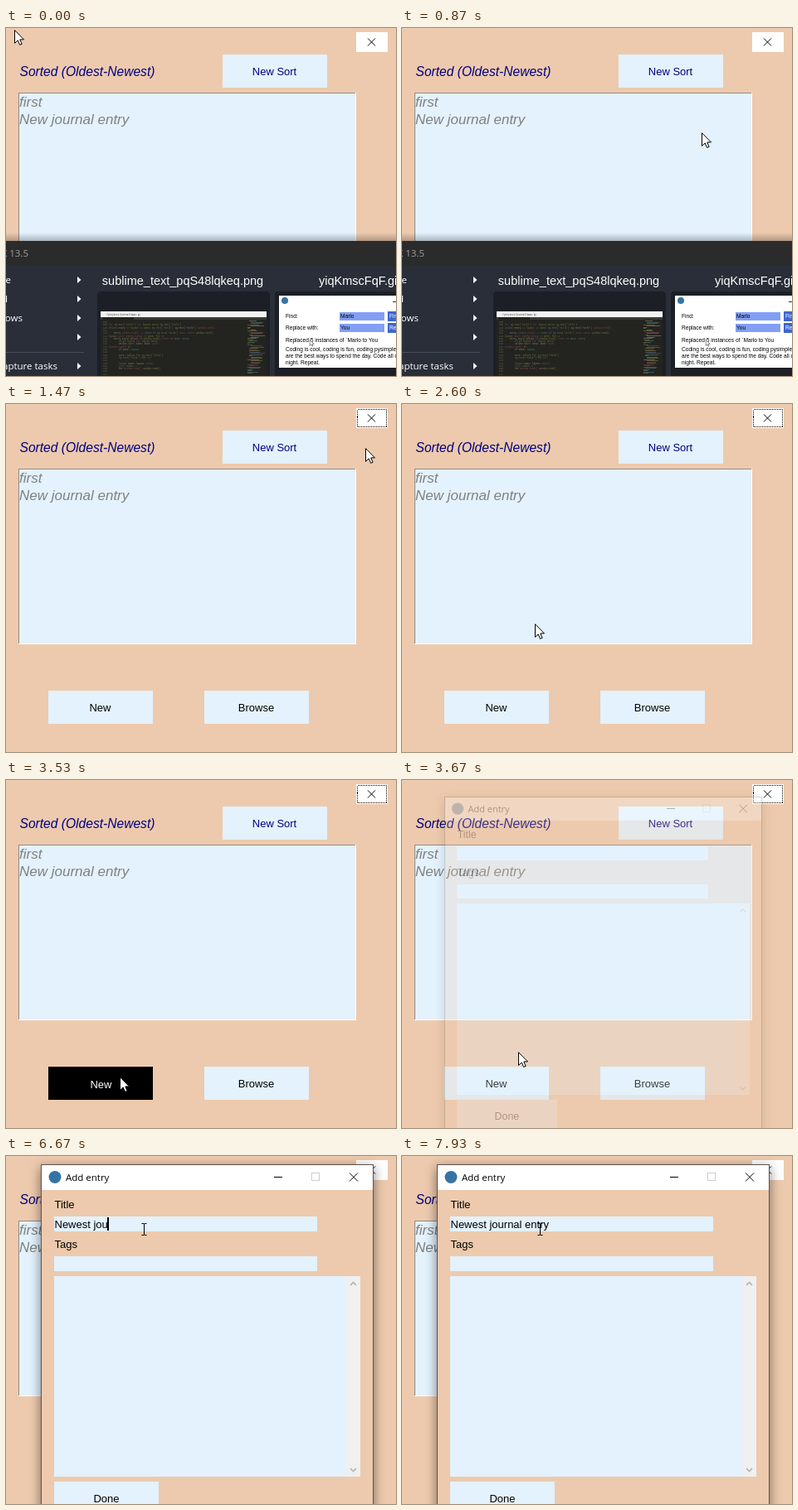
Animation of 470 by 420 pixels, one loop 8 s. Source, as an HTML page:

```html
<!DOCTYPE html>
<html lang="en">
<head>
<meta charset="utf-8">
<title>Journal app</title>
<style>
html, body { margin: 0; width: 100%; height: 100%; overflow: hidden; background: #edcaad; }
svg { display: block; width: 470px; height: 420px; }
rect { shape-rendering: crispEdges; }
text { font: 13px "Liberation Sans", Arial, sans-serif; white-space: pre; }
.mid { text-anchor: middle; }
.end { text-anchor: end; }
.navy { fill: #000080; }
.head { font-size: 15.6px; font-style: italic; }
.item { font-size: 17px; font-style: italic; fill: #808080; }
.ui { font: 11.5px "Open Sans", "Noto Sans", sans-serif; }
.file { font-size: 14.5px; fill: #fff; }
.small { font-size: 6.6px; }
.code { font: 2.7px "Liberation Mono", monospace; }
.pale { fill: #e3f2fd; }
.line { fill: none; stroke: #000; }
#shadow { filter: drop-shadow(0 4px 7px rgba(0, 0, 0, .5)); }
</style>
</head>
<body>
<svg viewBox="0 0 470 420">
  <defs>
    <linearGradient id="shade" x1="0" y1="0" x2="0" y2="1">
      <stop offset="0" stop-color="#000" stop-opacity="0"/>
      <stop offset="1" stop-color="#000" stop-opacity=".25"/>
    </linearGradient>
    <clipPath id="thumb"><rect x="114" y="342" width="200" height="78"/></clipPath>
  </defs>

  <!-- Main window -->
  <rect width="470" height="420" fill="#edcaad"/>
  <rect x="422" y="5" width="38" height="24" fill="#fff"/>
  <path class="line" d="M436 12.5l9 9m0-9l-9 9"/>
  <rect id="focus" class="line" x="423.5" y="6.5" width="35" height="21" stroke-dasharray="1 1"/>
  <text class="head navy" x="16.5" y="58">Sorted (Oldest-Newest)</text>
  <rect class="pale" x="261" y="32" width="126" height="40"/>
  <text class="mid navy" x="323.5" y="57">New Sort</text>
  <rect x="15" y="78" width="407" height="212" fill="#fff"/>
  <rect x="15" y="78" width="406" height="211" fill="#8c8c8c"/>
  <rect class="pale" x="16" y="79" width="405" height="210"/>
  <text class="item" x="16" y="95">first</text>
  <text class="item" x="16" y="116">New journal entry</text>
  <rect id="newBtn" x="51" y="346" width="126" height="40"/>
  <text id="newText" class="mid" x="113.5" y="371">New</text>
  <rect class="pale" x="239" y="346" width="126" height="40"/>
  <text class="mid" x="301.5" y="371">Browse</text>

  <!-- Capture tool covering the lower part -->
  <g id="tool">
    <rect x="0" y="247" width="470" height="10" fill="url(#shade)"/>
    <rect x="0" y="257" width="470" height="163" fill="#2a2e38"/>
    <rect x="0" y="257" width="470" height="30" fill="#2b2b2b"/>
    <text class="ui end" x="27" y="276" fill="#a0a0a0">K 13.5</text>
    <g class="ui" fill="#fff">
      <text class="ui end" x="6" y="308">re</text>
      <text class="ui end" x="2" y="331">d</text>
      <text class="ui end" x="20" y="354">ows</text>
      <text class="ui end" x="62" y="412">apture tasks</text>
      <path d="M86 300l4.5 4-4.5 4zm0 23l4.5 4-4.5 4zm0 23l4.5 4-4.5 4zm0 23l4.5 4-4.5 4zm0 35l4.5 4-4.5 4z"/>
    </g>
    <rect x="0" y="391" width="94" height="1" fill="#464b58"/>
    <text class="file mid" x="213" y="310">sublime_text_pqS48lqkeq.png</text>
    <text class="file" x="377" y="310">yiqKmscFqF.gif</text>
    <rect x="110" y="318" width="208" height="110" rx="4" fill="#1c1f25"/>
    <rect x="324" y="318" width="208" height="110" rx="4" fill="#1c1f25"/>

    <g id="editor" clip-path="url(#thumb)">
      <rect x="114" y="342" width="200" height="78" fill="#23241f"/>
      <rect x="114" y="342" width="200" height="7" fill="#f2f2f2"/>
      <rect x="114" y="349" width="200" height="3" fill="#3a3b36"/>
      <rect x="116" y="349" width="38" height="3" fill="#23241f"/>
      <text class="code" x="120" y="347" fill="#333">~/projects/journal/main.py</text>
    </g>

    <rect x="329" y="323" width="141" height="87" fill="#fff"/>
    <circle cx="336" cy="329" r="4" fill="#3673a5"/>
    <rect x="466" y="330" width="4" height="1" fill="#333"/>
    <rect x="402" y="343" width="54" height="10" fill="#829ff5"/>
    <rect x="402" y="357" width="54" height="10" fill="#829ff5"/>
    <rect x="460" y="342" width="10" height="12" fill="#3f66d0"/>
    <rect x="460" y="356" width="10" height="12" fill="#3f66d0"/>
    <text class="small" x="337" y="350">Find:</text>
    <text class="small" x="337" y="364">Replace with:</text>
    <text class="small" x="403" y="350">Marlo</text>
    <text class="small" x="403" y="364">You</text>
    <text class="small" x="462" y="350" fill="#fff">Find</text>
    <text class="small" x="462" y="364" fill="#fff">Replace</text>
    <text class="small" x="337" y="379">Replaced 5 instances of `Marlo to You</text>
    <text class="small" x="337" y="390">Coding is cool, coding is fun, coding pysimplegui</text>
    <text class="small" x="337" y="398">are the best ways to spend the day. Code all day, all</text>
    <text class="small" x="337" y="406">night. Repeat.</text>
    <use href="#arrow" transform="translate(366 376) scale(.45)"/>
  </g>

  <!-- Add entry dialog -->
  <g id="dialog">
    <rect id="shadow" x="42" y="10" width="401" height="440" fill="#5c5550"/>
    <rect x="43" y="11" width="399" height="30" fill="#fff"/>
    <rect x="43" y="41" width="399" height="400" fill="#edcaad"/>
    <circle cx="59" cy="25.500" r="7.500" fill="#3673a5"/>
    <text class="ui" x="72" y="30">Add entry</text>
    <rect x="323" y="25" width="10" height="1"/>
    <rect class="line" x="368.5" y="20.500" width="9" height="9" style="stroke:#ccc"/>
    <path class="line" d="M414 20.500l10 10m0-10l-10 10"/>
    <text x="58.500" y="63">Title</text>
    <rect class="pale" x="58" y="73" width="317" height="18"/>
    <text id="typed" x="58.500" y="87"></text>
    <rect id="caret" y="74" width="2" height="16"/>
    <text x="58.500" y="111">Tags</text>
    <rect class="pale" x="58" y="121" width="317" height="18"/>
    <rect class="pale" x="58" y="145" width="369" height="242"/>
    <rect x="410" y="145" width="17" height="242" fill="#f0f0f0"/>
    <path class="line" d="M415 156l3.500-3.500 3.500 3.500M415 377l3.500 3.500 3.500-3.500" style="stroke:#b4b4b4;stroke-width:1.700"/>
    <rect class="pale" x="58" y="393" width="126" height="40"/>
    <text class="mid" x="121" y="418">Done</text>
  </g>

  <path id="beam" class="line" d="M-3 -6.500h2.500l.5 .5 .5-.5h2.500M0 -6v13M-3 7.500h2.500l.5-.5 .5 .5h2.500"/>
  <g id="pointer"><path id="arrow" d="M.5 .7V16.400L4.200 12.900 6.600 18.400 9.100 17.300 6.800 11.900H11.500Z" fill="#fff" stroke="#000"/></g>
</svg>
<script>
const LOOP = 8000, TICK = 200 / 3;
const el = id => document.getElementById(id);
const [focusBox, newBtn, newText, tool, dialog, typed, caret, beam, pointer] =
  ["focus", "newBtn", "newText", "tool", "dialog", "typed", "caret", "beam", "pointer"].map(el);

// Pointer path: time, x, y
const PATH = [
  [200, 10, 2], [333, 60, 70], [467, 150, 165], [600, 245, 212], [733, 318, 180],
  [867, 361, 126], [1067, 387, 83], [1200, 415, 63], [1333, 433, 53],
  [1867, 433, 53], [2067, 395, 90], [2333, 270, 190], [2533, 175, 255], [2733, 130, 285],
  [2933, 127, 315], [3133, 142, 345], [3333, 137, 358],
  [3600, 137, 358], [3733, 143, 300], [3933, 160, 140], [4067, 166.5, 88]
];

// Typing: time, number of letters shown
const ENTRY = "Newest journal entry";
const KEYS = [
  [5333, 1], [5467, 2], [5533, 3], [5733, 4], [5867, 5], [6000, 6], [6200, 7],
  [6533, 9], [6667, 10], [6800, 11], [6933, 12], [7000, 13], [7067, 14], [7133, 15],
  [7333, 16], [7467, 17], [7533, 18], [7733, 20]
];

// Times at which the caret switches, starting with on
const BLINK = [3867, 4333, 4600, 5200, 5533, 6133, 6400, 7067, 7267, 7933];

function pointAt(t) {
  const i = PATH.findIndex(p => p[0] > t);
  if (i === 0) return PATH[0].slice(1);
  if (i < 0) return PATH[PATH.length - 1].slice(1);
  const [a, b] = [PATH[i - 1], PATH[i]];
  const k = (t - a[0]) / (b[0] - a[0]);
  return [a[1] + (b[1] - a[1]) * k, a[2] + (b[2] - a[2]) * k];
}

const show = (node, on) => node.setAttribute("visibility", on ? "visible" : "hidden");

function draw(now) {
  const t = Math.floor((now % LOOP + 4) / TICK) * TICK + 1;

  show(tool, t < 1460);
  show(focusBox, t > 1460 && t < 3700);

  const down = t > 3530 && t < 3660;
  newBtn.setAttribute("fill", down ? "#000" : "#e3f2fd");
  newText.setAttribute("fill", down ? "#fff" : "#000");
  newText.setAttribute("transform", down ? "translate(1 1)" : "");

  const open = Math.max(0, Math.min(1, (t - 3600) / 266));
  const size = 1 - .08 * (1 - open) ** 2;
  show(dialog, open > .02);
  dialog.setAttribute("opacity", open);
  dialog.setAttribute("transform",
    open < 1 ? `translate(242 230) scale(${size}) translate(-242 -230)` : "");

  const count = KEYS.reduce((n, k) => t >= k[0] ? k[1] : n, 0);
  typed.textContent = ENTRY.slice(0, count);
  const width = count ? typed.getComputedTextLength() : 0;
  caret.setAttribute("x", Math.round(58 + width));
  show(caret, BLINK.filter(b => t >= b).length % 2 === 1);

  const [x, y] = pointAt(t);
  const overText = t > 3900;
  show(beam, overText);
  show(pointer, !overText);
  beam.setAttribute("transform", `translate(${Math.floor(x) + .5} ${Math.round(y)})`);
  pointer.setAttribute("transform", `translate(${Math.round(x)} ${Math.round(y)})`);
}

function fillEditor() {
  let seed = 7;
  const rand = () => (seed = seed * 16807 % 2147483647) / 2147483647;
  const pick = list => list[Math.floor(rand() * list.length)];
  const words = ["if", "event", "window.read()", "sg.Text('Title')", "values", "==", "layout", "for", "entry", "None:"];
  const inks = ["#a8a894", "#8a9a4a", "#a04a64", "#9a8c54", "#5f8f9a"];
  const add = (tag, attrs, text = "") => {
    const node = document.createElementNS("http://www.w3.org/2000/svg", tag);
    for (const key in attrs) node.setAttribute(key, attrs[key]);
    node.textContent = text;
    el("editor").append(node);
  };
  for (let y = 356; y < 420; y += 3.3) {
    add("text", { class: "code", x: 117, y, fill: "#66675c" }, String(Math.round(y / 3.3)));
    if (rand() < .3) continue;
    let x = 124 + 6 * Math.floor(rand() * 3);
    const total = y < 385 ? 4 + rand() * 6 : 1 + rand() * 3;
    for (let n = 0; n < total; n++) {
      const word = pick(words);
      add("text", { class: "code", x, y, fill: pick(inks), opacity: .75 }, word);
      x += (word.length + 1) * 1.62;
    }
  }
  for (let y = 353; y < 417; y += 1.5) {
    add("rect", { x: 291 + 2 * Math.floor(rand() * 3), y, width: 3 + rand() * 14, height: 1, fill: pick(inks), opacity: .45 });
  }
}

fillEditor();
const start = performance.now();
function loop() {
  draw(performance.now() - start);
  requestAnimationFrame(loop);
}
loop();
</script>
</body>
</html>
```
